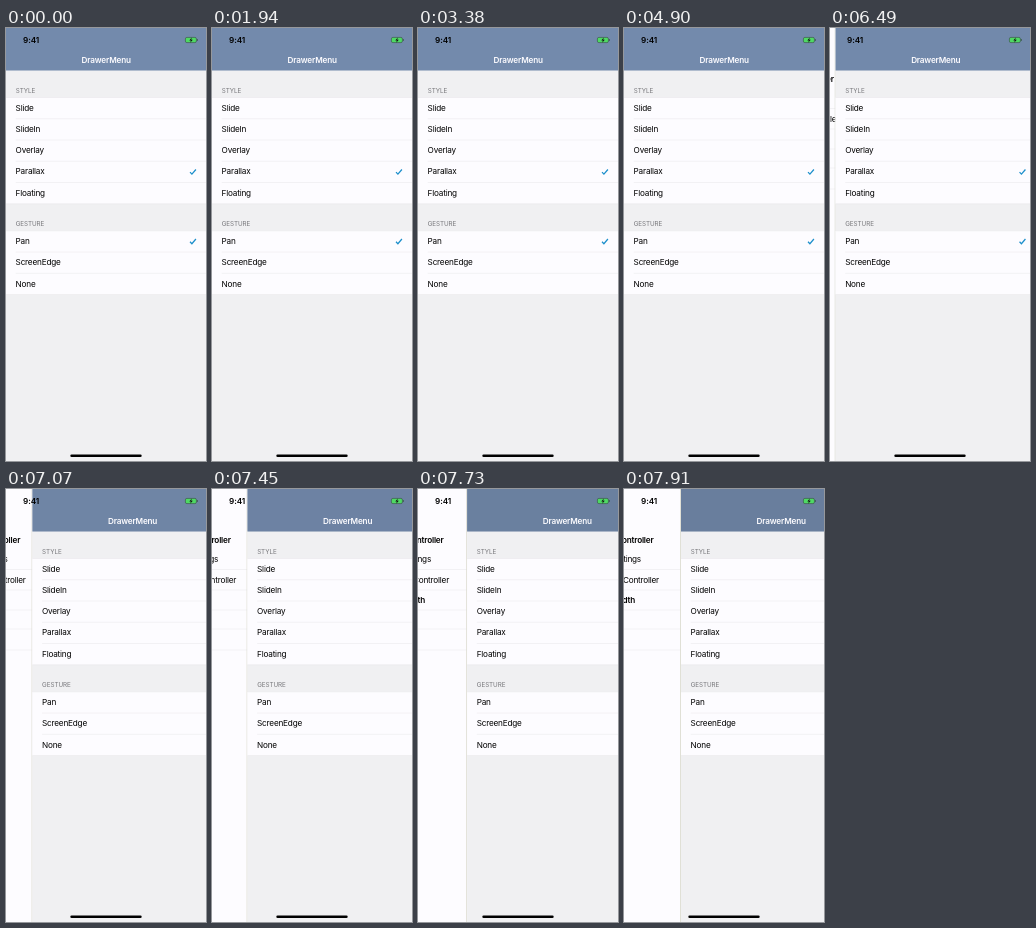
Write an HTML page that moves like this. It is 200 px wide and 433 px high and loops after 8000 ms.

```html
<!DOCTYPE html>
<html lang="en">
<head>
<meta charset="utf-8">
<title>Drawer menu</title>
<style>
  @property --drag { syntax: "<number>"; inherits: true; initial-value: 0; }

  html, body { margin: 0; width: 100%; height: 100%; overflow: hidden; background: #fdfcff; }
  svg {
    display: block; width: 100vw; height: 100vh;
    font: 8.2px Inter, Roboto, sans-serif; letter-spacing: -.2px;
    animation: drag 8s linear infinite;
  }
  .panel { transform: translateX(calc(var(--drag) * 1px)); }
  .menu { transform: translateX(calc(var(--drag) * .5px - 28.5px)); text-anchor: end; }
  .dim { opacity: calc(var(--drag) * .0015); }
  .bold { font-weight: 600; }
  .header { font-size: 6.28px; letter-spacing: -.04px; fill: #76767a; }
  .line { stroke: #e6e5e8; stroke-width: .5; }
  .check { fill: none; stroke: #1c8fcb; stroke-width: 1.25; }

  @keyframes drag {
    0%, 76.75% { --drag: 0; }
    81.125% { --drag: 5.5; }
    86.625%, 87.75% { --drag: 23; }
    88.375%, 89.5% { --drag: 26.4; }
    93.125% { --drag: 35.4; }
    97.125%, 98.25% { --drag: 51; }
    98.875%, 100% { --drag: 57; }
  }
</style>
</head>
<body>
<svg viewBox="0 0 200 433" preserveAspectRatio="none">
  <rect width="200" height="433" fill="#fdfcff"/>
  <g class="menu" id="menu"></g>

  <g class="panel">
    <rect x="-.8" width=".8" height="433" fill="#d9d9cc"/>
    <rect width="200" height="433" fill="#f0f0f2"/>
    <rect width="200" height="42.5" fill="#738aac"/>
    <rect class="dim" width="200" height="42.5"/>
    <text class="bold" x="100.2" y="35" fill="#fdfcff" text-anchor="middle">DrawerMenu</text>
    <g id="sections"></g>
  </g>

  <text class="bold" x="17" y="15" style="letter-spacing:-.1px">9:41</text>
  <g>
    <rect x="179.4" y="9.4" width="11" height="5.2" rx="1.5" fill="#4fd964" stroke="#35513f" stroke-width=".6"/>
    <path d="M191.4 11.1v1.8" stroke="#35513f" stroke-width=".8"/>
    <path d="M185.8 9.4l-2.5 3h1.6l-.7 2.3 2.6-3h-1.6z" fill="#111"/>
  </g>
  <rect x="64.3" y="426.6" width="71.4" height="2.5" rx="1.25"/>
</svg>
<script>
  const ROW = 21.26;
  const line = (x, y, end = 200) => `<path class="line" d="M${x} ${y}H${end}"/>`;

  function section(title, top, rows, checked) {
    const height = ROW * rows.length;
    const cells = rows.map((label, i) => {
      const y = top + ROW * i;
      const check = i === checked
        ? `<path class="check" d="M184 ${y + 10.9}l1.9 2 4-4.7"/>` : '';
      return line(i ? 9.7 : 0, y) + `<text x="9.6" y="${y + 13.2}">${label}</text>` + check;
    });
    return `<text class="header" x="9.7" y="${top - 4.6}">${title}</text>
      <rect y="${top}" width="200" height="${height}" fill="#fdfcff"/>
      ${cells.join('')}${line(0, top + height)}`;
  }

  document.getElementById('sections').innerHTML =
    section('STYLE', 69.5, ['Slide', 'SlideIn', 'Overlay', 'Parallax', 'Floating'], 3) +
    section('GESTURE', 202.8, ['Pan', 'ScreenEdge', 'None'], 0);

  // Menu labels are placed by their right edge: only their ends come into view.
  const labels = [
    ['ViewController', 29.5, 54, 'bold'],
    ['Settings', 17, 73],
    ['ViewController', 35, 94],
    ['Width', 11, 114, 'bold'],
  ];
  document.getElementById('menu').innerHTML =
    [80.5, 101, 121, 140, 161].map(y => line(-90, y)).join('') +
    labels.map(([label, x, y, weight = '']) =>
      `<text class="${weight}" x="${x}" y="${y}">${label}</text>`).join('');
</script>
</body>
</html>
```
